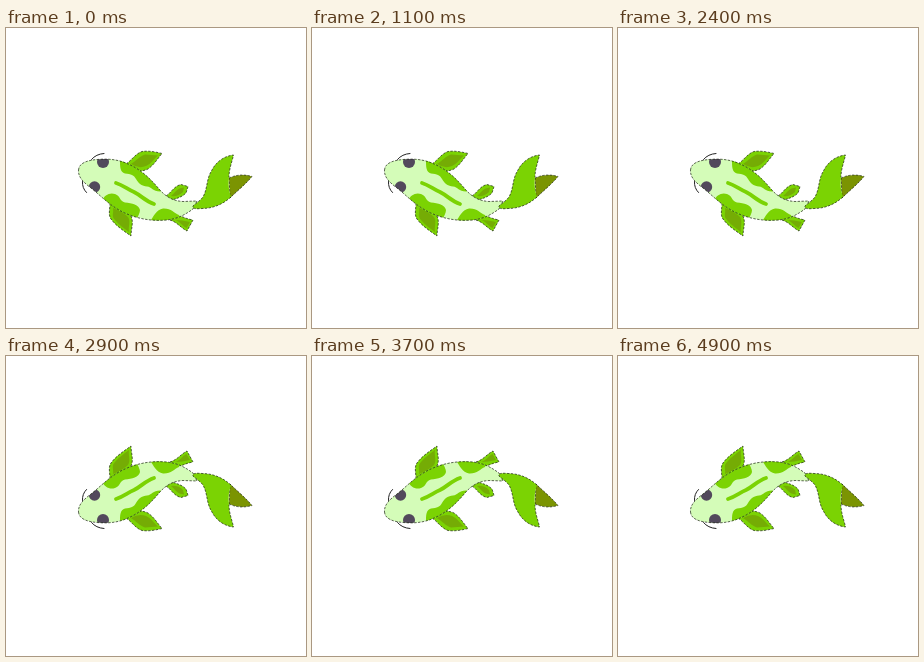
An HTML page for the animation above (5000 ms loop, 300 px wide and 300 px high).

```html
<!DOCTYPE html>
<html lang="en">
<head>
<meta charset="utf-8">
<title>Swimming koi</title>
<style>
  html, body { margin: 0; width: 100%; height: 100%; overflow: hidden; background: #fff; }
  svg { display: block; width: 100vw; height: 100vh; }
  .line { stroke: #1c2414; stroke-width: .7; stroke-dasharray: 2.4 1.4; stroke-linejoin: round; }
  .green { fill: #7bd303; }
  .inner { fill: #75ac05; }
  .barbel { fill: none; stroke: #222; stroke-width: 1; stroke-linecap: round; }
</style>
</head>
<body>
<svg viewBox="0 0 300 300">
  <defs>
    <path id="body" d="M72.500 142C73 135 81 132 94 131.300C105 130.500 115 132.500 122 136C134 141 144 150 153 161C160 169 167 173 177 173.500L191 173L187 181C180 186 171 192 156 192.300C141 193 125 189 113 182C101 175 94 167 85 160C77 154 72 149 72.500 142Z"/>
    <clipPath id="inside"><use href="#body"/></clipPath>
  </defs>
  <g id="fish">
    <!-- fins -->
    <path class="line green" d="M120 136C126 132 129 126 136 123.500C143 122.500 150 124 156 125.500C152 130 148 137 142 141C137 143.500 132 143 126 143Z"/>
    <path class="inner" d="M125 136C130 133 134 128 139 126.500L152 127.500C148 131 145 136 140 138Q133 141 125 136Z"/>
    <path class="line green" d="M104 175C104 181 102 187 105 191C110 198 118 203 125 208C125 201 128 194 125 188L118 180Z"/>
    <path class="inner" d="M107 180C108 185 105 188 109 192C113 197 118 200 123 204C122 198 125 194 122 189Q117 184 107 180Z"/>
    <path class="line green" d="M160 168C165 165 168 158 175 156.500L182 158.500L180 165C176 169 172 170 166 172Z"/>
    <path class="inner" d="M165 168C169 165 171 160 178 159.500L177 164Q172 169 165 168Z"/>
    <path class="line green" d="M164 192C171 194 175 200 181 203L187 192C181 191 177 189 172 187Z"/>
    <path class="inner" d="M169 192C174 193 176 198 180.500 200L184 194Q176 192 169 192Z"/>
    <!-- body and markings -->
    <use href="#body" fill="#d4fcb8"/>
    <g clip-path="url(#inside)" class="green">
      <path d="M114 132C114 139 114 144 119 145.500C125 146 128 147 130 151C133 156 136 158 141 158.500C146 159 147 164 155 163.500L150 145L125 129Z"/>
      <path d="M96 173C98 167 104 164 109 166C115 168 113 173 119 174.500C126 175 133 177 134 182C134 185 132 188 130 193L105 184Z"/>
      <path d="M144 194C147 189 150 182 157 180.500C165 180 168 185 173 187L176 194Z"/>
      <circle cx="97" cy="134" r="6" fill="#52495c"/>
      <circle cx="88.500" cy="159" r="5.700" fill="#52495c"/>
    </g>
    <path d="M110 155C117 157 121 161 128 164C136 168 139 173 148 176" fill="none" stroke="#7bd303" stroke-width="3.800" stroke-linecap="round"/>
    <use href="#body" class="line" fill="none"/>
    <!-- tail -->
    <path class="line" fill="#7b9402" d="M223 150Q234 145 246 148.500C240 156 231 163 224 170Z"/>
    <path class="green" d="M223 149C222 157 223 163 225 169C216 177 206 180.500 196 180.500C191 181 186 181 187 178C190 175 194 173 197 169C202 160 200 151 206 142C210 134 218 128 227.500 127C226 134 223 141 223 149Z"/>
    <path class="line" fill="none" d="M225 169C216 177 206 180.500 196 180.500C191 181 186 181 187 178C190 175 194 173 197 169C202 160 200 151 206 142C210 134 218 128 227.500 127C226 134 223 141 223 149"/>
    <path class="barbel" d="M85.500 131.500Q90 126 98 125.500"/>
    <path class="barbel" d="M76.500 153.500Q76 160 80.500 164.500"/>
  </g>
</svg>
<script>
  const fish = document.getElementById("fish");
  const POSE_MS = 500, AXIS_Y = 149;

  // The fish snaps between one pose and its vertical mirror image.
  function draw() {
    const flipped = Math.floor(performance.now() / POSE_MS) % 2 === 1;
    fish.setAttribute("transform", flipped ? `matrix(1 0 0 -1 0 ${2 * AXIS_Y})` : "");
    requestAnimationFrame(draw);
  }
  draw();
</script>
</body>
</html>
```
